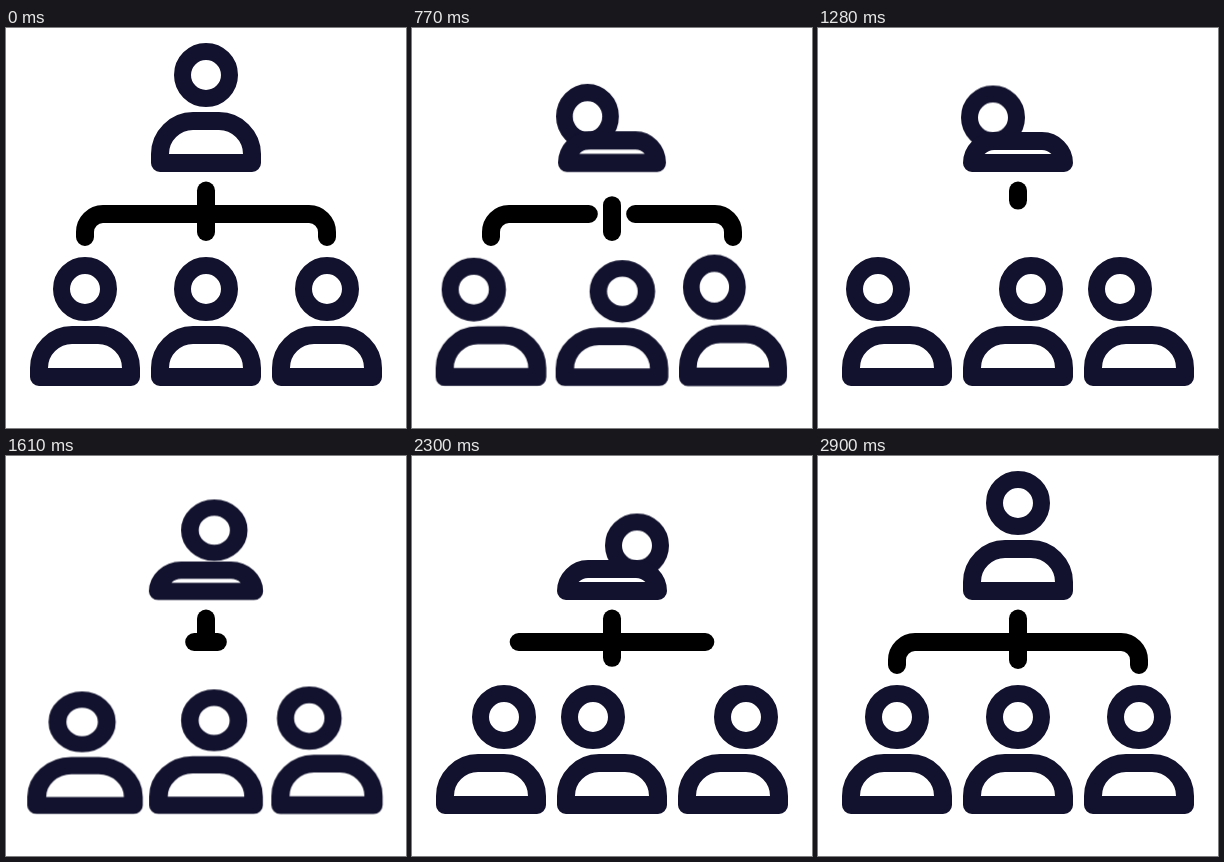
An HTML page without scripts that plays this animation: 400 by 400 pixels, repeating every 2930 ms.

```html
<!DOCTYPE html>
<html lang="en">
<head>
<meta charset="utf-8">
<title>Team hierarchy</title>
<style>
html, body { margin: 0; width: 100%; height: 100%; overflow: hidden; background: #fff; }
svg { display: block; width: 100vw; height: 100vh; }
svg * {
  animation-duration: 2930ms;
  animation-iteration-count: infinite;
  animation-timing-function: cubic-bezier(.333, 0, .667, 1);
}

.people { fill: none; stroke: #12122f; stroke-width: 18; stroke-linejoin: round; }
.people circle { stroke-width: 17; }
.lines { fill: none; stroke: #000; stroke-width: 18; stroke-linecap: round; stroke-dasharray: 100 300; }

/* each person squashes three times per loop */
.person {
  animation-name: squash, squash, squash;
  animation-delay: var(--a), var(--b), var(--c);
  animation-composition: add;
}
.boss { --a: 525ms; --b: 1465ms; --c: 2431ms; }
.left { --a: 578ms; --b: 1490ms; --c: 2498ms; }
.mid { --a: 604ms; --b: 1550ms; --c: 2467ms; }
.right { --a: 525ms; --b: 1580ms; --c: 2498ms; }

@keyframes squash {
  0%, 13.65%, 100% { transform: scale(1, 1); }
  3.5% { transform: scale(1.053, .947); }
  8.6% { transform: scale(.981, 1.019); }
}

.boss circle { animation-name: boss-x, boss-y; }
.boss path { animation-name: duck; }
.left circle { animation-name: left-x; }
.mid circle { animation-name: mid-x; }
.right circle { animation-name: right-x; }

@keyframes boss-x {
  0%, 17.92%, 91.16%, 100% { translate: 0 0; }
  26.11%, 50% { translate: -25px 0; }
  58.19%, 82.97% { translate: 25px 0; }
}
@keyframes boss-y {
  0%, 17.92%, 91.16%, 100% { transform: translateY(0); }
  26.11%, 50%, 58.19%, 82.97% { transform: translateY(42.5px); }
  54.1% { transform: translateY(22px); }
}
@keyframes duck {
  0%, 17.92%, 91.16%, 100% {
    d: path("M-46 -9V-18C-46 -36 -31 -51 -13 -51H13C31 -51 46 -36 46 -18V-9Z");
  }
  26.11%, 82.97% {
    d: path("M-46 -9V-9C-46 -21 -36 -31 -24 -31H24C36 -31 46 -21 46 -9V-9Z");
  }
}
@keyframes left-x {
  0%, 19.73%, 93.45%, 100% { translate: 0 0; }
  27.92%, 50.85% { translate: -19px 0; }
  59.04%, 85.26% { translate: 13px 0; }
}
@keyframes mid-x {
  0%, 20.61%, 92.39%, 100% { translate: 0 0; }
  28.81%, 52.9% { translate: 13px 0; }
  61.09%, 84.2% { translate: -19px 0; }
}
@keyframes right-x {
  0%, 17.92%, 93.45%, 100% { translate: 0 0; }
  26.11%, 53.92% { translate: -19px 0; }
  62.12%, 85.26% { translate: 13px 0; }
}

/* lines run out at one end, then grow again from the start */
.stem { animation-name: stem; }
.arm { animation-name: arm; }
@keyframes stem {
  0%, 19.45% { stroke-dashoffset: 0; }
  36.52% { stroke-dashoffset: -100; }
  36.53%, 36.68% { stroke-dashoffset: 120; }
  36.69% { stroke-dashoffset: 100; animation-timing-function: cubic-bezier(.333, .667, .667, 1); }
  90.78%, 100% { stroke-dashoffset: 0; }
}
@keyframes arm {
  0%, 21.84% { stroke-dashoffset: 0; }
  38.91% { stroke-dashoffset: -100; }
  38.92%, 45.38% { stroke-dashoffset: 120; }
  45.39% { stroke-dashoffset: 100; }
  98.29%, 100% { stroke-dashoffset: 0; }
}
</style>
</head>
<body>
<svg viewBox="0 0 400 400">
  <g class="lines">
    <path class="stem" pathLength="100" d="M200 162.5V204"/>
    <path class="arm" pathLength="100" d="M200 186H303A18 18 0 0 1 321 204V209"/>
    <path class="arm" pathLength="100" d="M200 186H97A18 18 0 0 0 79 204V209"/>
  </g>
  <g class="people">
    <g transform="translate(200 144)">
      <g class="person boss">
        <circle cy="-97" r="23.5"/>
        <path d="M-46 -9V-18C-46 -36 -31 -51 -13 -51H13C31 -51 46 -36 46 -18V-9Z"/>
      </g>
    </g>
    <g transform="translate(79 358)">
      <g class="person left">
        <circle cy="-97" r="23.5"/>
        <path d="M-46 -9V-18C-46 -36 -31 -51 -13 -51H13C31 -51 46 -36 46 -18V-9Z"/>
      </g>
    </g>
    <g transform="translate(200 358)">
      <g class="person mid">
        <circle cy="-97" r="23.5"/>
        <path d="M-46 -9V-18C-46 -36 -31 -51 -13 -51H13C31 -51 46 -36 46 -18V-9Z"/>
      </g>
    </g>
    <g transform="translate(321 358)">
      <g class="person right">
        <circle cy="-97" r="23.5"/>
        <path d="M-46 -9V-18C-46 -36 -31 -51 -13 -51H13C31 -51 46 -36 46 -18V-9Z"/>
      </g>
    </g>
  </g>
</svg>
</body>
</html>
```
